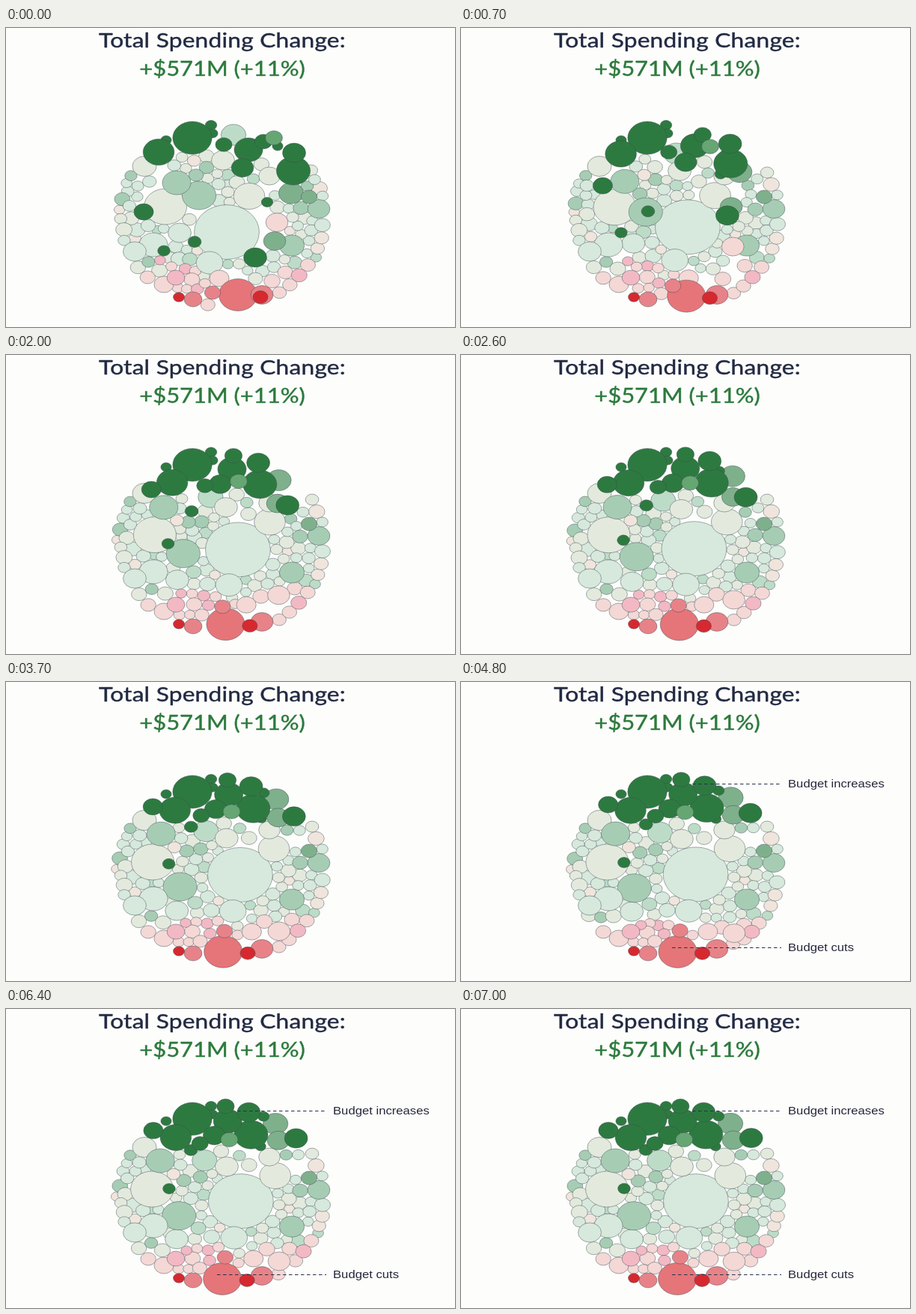
An HTML page with a canvas for the animation above (7100 ms loop, 600 px wide and 400 px high).

```html
<!DOCTYPE html>
<html lang="en">
<head>
<meta charset="utf-8">
<title>Total Spending Change</title>
<style>
  html, body { margin: 0; width: 100%; height: 100%; overflow: hidden; background: #fdfdfc; }
  canvas { display: block; }
</style>
</head>
<body>
<canvas id="stage" width="600" height="400"></canvas>
<script>
const ctx = document.getElementById('stage').getContext('2d');
const LOOP = 7100, STEP = 100, STEPS = LOOP / STEP;
const LABELS_FROM = 4400;
const SETTLE_TIME = 1300;
const HOME_STEP = 48;
const WIDE = 1.19; // horizontal stretch of bubbles and text
const DISK = { x: 289.5, y: 252, rx: 144.5, ry: 131 };

const DARK = '#2d7a40', LEAF = '#66a673', OLIVE = '#7fb08c', TEAL = '#a6cdb4', MINT = '#bddcc8',
  PALE = '#d6e9dc', CREAM = '#e3eadd', SAND = '#efe5dc', BLUSH = '#f4d8d6', PINK = '#f2b9c4',
  ROSE = '#e78388', CORAL = '#e57579', RED = '#d6292f';

const anchors = [];

// radius, resting x and y, then the starting x and y of those that travel
function bubble(color, r, x, y, fromX = x, fromY = y) {
  anchors.push({ color, r, x, y, fromX, fromY });
}

bubble(PALE, 36.5, 314, 257, 295, 273);
bubble(CREAM, 24, 195, 241, 213, 239);
bubble(CREAM, 17.5, 360, 223, 325, 225);
bubble(PALE, 15, 305, 306, 272, 314);
bubble(PALE, 13, 228, 308, 232, 274);
bubble(CREAM, 13.5, 185, 185);
bubble(TEAL, 19, 231, 277, 258, 224);
bubble(TEAL, 16, 206, 203, 228, 207);
bubble(TEAL, 14, 382, 291);
bubble(TEAL, 12.5, 418, 242);
bubble(MINT, 14, 265, 203, 304, 143);
bubble(PALE, 16, 197, 290);
bubble(PALE, 13, 172, 299);
bubble(CREAM, 13, 295, 211, 290, 177);
bubble(CREAM, 12, 352, 198);

bubble(BLUSH, 12.5, 365, 338, 362, 260);
bubble(BLUSH, 11, 211, 343);
bubble(BLUSH, 11, 331, 334, 285, 335);
bubble(PINK, 10, 227, 334);
bubble(CORAL, 21.5, 289, 361, 310, 357);
bubble(ROSE, 12.5, 342, 357);
bubble(ROSE, 10, 250, 363);
bubble(ROSE, 9, 293, 332, 276, 354);
bubble(RED, 8.5, 322, 363, 340, 360);
bubble(RED, 6.3, 231, 360);

bubble(OLIVE, 14, 360, 153, 381, 221);
bubble(OLIVE, 12.5, 364, 175, 359, 285);
bubble(OLIVE, 9, 405, 226);
bubble(DARK, 6.5, 274, 130);
bubble(DARK, 6, 214, 150);
bubble(DARK, 6, 276, 141);
bubble(DARK, 6, 340, 184, 363, 158);
bubble(DARK, 7.5, 247, 188, 252, 286);
bubble(DARK, 7, 218, 240, 211, 298);
bubble(DARK, 6.5, 344, 143, 349, 233);
bubble(DARK, 22, 249, 147);
bubble(DARK, 17.5, 227, 172, 204, 166);
bubble(DARK, 19, 327, 168, 384, 191);
bubble(DARK, 16, 296, 150, 324, 163);
bubble(DARK, 13, 324, 138, 385, 167);
bubble(DARK, 12.5, 278, 169, 316, 187);
bubble(DARK, 13, 388, 172, 333, 307);
bubble(DARK, 11, 197, 162, 184, 246);
bubble(DARK, 9.8, 293, 130, 344, 152);
bubble(DARK, 9.3, 259, 180, 291, 156);
bubble(LEAF, 9.6, 298, 175, 358, 147);

let seed = 20131;
function random() {
  seed = (Math.imul(seed, 1664525) + 1013904223) >>> 0;
  return seed / 4294967296;
}
const between = (low, high) => low + (high - low) * random();
const pick = list => list[Math.floor(random() * list.length)];
const clamp = (v, low, high) => Math.max(low, Math.min(high, v));

function anchorsAt(step) {
  const away = Math.exp(-step * STEP / SETTLE_TIME);
  return anchors.map(a => ({
    color: a.color, r: a.r,
    x: a.x + (a.fromX - a.x) * away,
    y: a.y + (a.fromY - a.y) * away
  }));
}

function separate(a, b, shareA, shareB) {
  const dx = (a.x - b.x) / WIDE, dy = a.y - b.y;
  const d = Math.hypot(dx, dy) || 0.01, overlap = a.r + b.r - d;
  if (overlap <= 0) return;
  const ux = dx / d * overlap * WIDE, uy = dy / d * overlap;
  a.x += ux * shareA; a.y += uy * shareA;
  b.x -= ux * shareB; b.y -= uy * shareB;
}

function keepInDisk(f) {
  const dx = f.x - DISK.x, dy = f.y - DISK.y;
  const n = Math.hypot(dx / (DISK.rx - f.r * WIDE), dy / (DISK.ry - f.r));
  if (n > 1) {
    f.x = DISK.x + dx / n;
    f.y = DISK.y + dy / n;
  }
}

// Small bubbles push each other apart and give way to the large ones.
function relax(small, fixed, passes, keepInBand) {
  for (let pass = 0; pass < passes; pass++) {
    small.forEach((f, i) => {
      for (let j = 0; j < i; j++) separate(f, small[j], 0.4, 0.4);
      for (const a of fixed) separate(f, a, 0.8, 0);
      if (keepInBand) f.y = clamp(f.y, f.top + f.r, f.bottom - f.r);
      keepInDisk(f);
    });
  }
  return small;
}

function scatter(count, top, bottom, colors) {
  return Array.from({ length: count }, () => ({
    r: 6 + 3.4 * random() ** 1.5,
    x: between(DISK.x - DISK.rx, DISK.x + DISK.rx),
    y: between(top, bottom),
    top, bottom, color: pick(colors)
  }));
}

function follow(small, fixed) {
  const next = small.map(f => ({
    ...f,
    x: f.x + (f.homeX - f.x) * 0.05,
    y: f.y + (f.homeY - f.y) * 0.05
  }));
  return relax(next, fixed, 8, false);
}

function buildTimeline() {
  const fixed = Array.from({ length: STEPS }, (_, i) => anchorsAt(i));
  const settled = relax([
    ...scatter(78, 180, 322, [PALE, PALE, PALE, CREAM, CREAM, SAND, MINT, TEAL]),
    ...scatter(17, 319, 357, [BLUSH, BLUSH, BLUSH, PINK])
  ], fixed[HOME_STEP], 250, true);
  for (const f of settled) {
    f.homeX = f.x;
    f.homeY = f.y;
  }
  const small = [];
  small[HOME_STEP] = settled;
  for (let i = HOME_STEP - 1; i >= 0; i--) small[i] = follow(small[i + 1], fixed[i]);
  for (let i = HOME_STEP + 1; i < STEPS; i++) small[i] = follow(small[i - 1], fixed[i]);
  return fixed.map((large, i) => [...small[i], ...large]);
}

function drawBubble({ x, y, r, color }) {
  ctx.beginPath();
  ctx.ellipse(x, y, r * WIDE, r, 0, 0, Math.PI * 2);
  ctx.fillStyle = color;
  ctx.fill();
  ctx.stroke();
}

function drawText(text, x, y, font, color, align = 'left', spacing = 0) {
  ctx.save();
  ctx.scale(WIDE, 1);
  ctx.font = font;
  ctx.fillStyle = color;
  ctx.textAlign = align;
  ctx.letterSpacing = spacing + 'px';
  ctx.fillText(text, x / WIDE, y);
  if (align === 'center') {
    // a hairline outline gives the headings a medium weight
    ctx.strokeStyle = color;
    ctx.lineWidth = 0.4;
    ctx.strokeText(text, x / WIDE, y);
  }
  ctx.restore();
}

function drawLabel(text, fromX, y) {
  ctx.save();
  ctx.strokeStyle = '#26314a';
  ctx.lineWidth = 1;
  ctx.setLineDash([4.5, 3.5]);
  ctx.beginPath();
  ctx.moveTo(fromX, y);
  ctx.lineTo(428, y);
  ctx.stroke();
  ctx.restore();
  drawText(text, 437, y + 4.5, '14px "Liberation Sans", Arial, sans-serif', '#26283a');
}

const timeline = buildTimeline();

function draw(time) {
  ctx.fillStyle = '#fdfdfc';
  ctx.fillRect(0, 0, 600, 400);
  drawText('Total Spending Change:', 289, 25.5, '26.6px Lato, sans-serif', '#222a42', 'center', 0.2);
  drawText('+$571M (+11%)', 289, 63.5, '26px Lato, sans-serif', '#2c7a3c', 'center');
  ctx.strokeStyle = 'rgba(60, 75, 80, 0.5)';
  ctx.lineWidth = 0.9;
  timeline[Math.floor(time / STEP)].forEach(drawBubble);
  if (time >= LABELS_FROM) {
    drawLabel('Budget increases', 309, 136.5);
    drawLabel('Budget cuts', 282, 355.5);
  }
}

const start = performance.now();
function tick() {
  draw((performance.now() - start) % LOOP);
  requestAnimationFrame(tick);
}
tick();
</script>
</body>
</html>
```
